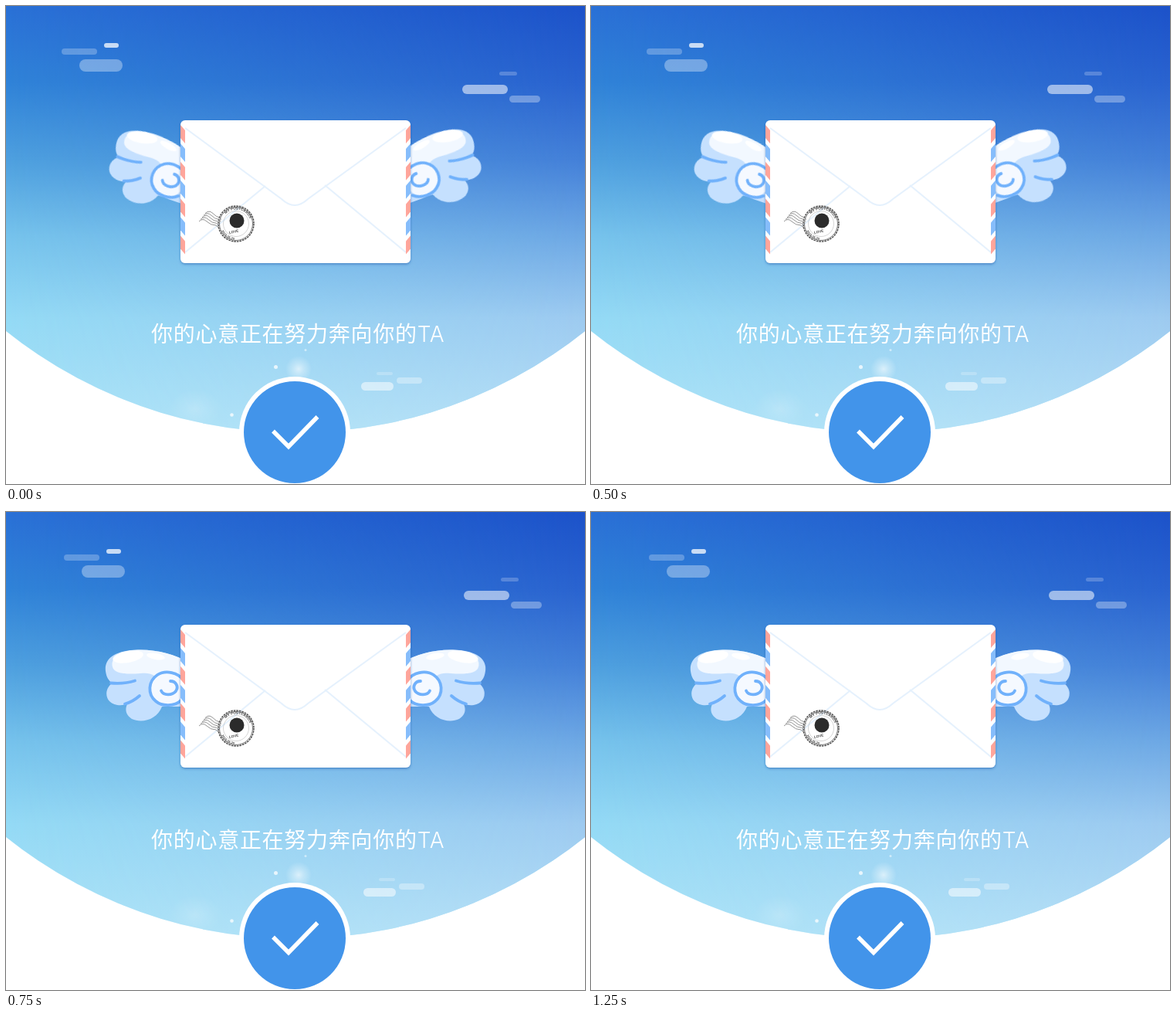
These frames come from a looping animation (750x619 px, 1500 ms). An HTML page:

```html
<!DOCTYPE html>
<html lang="zh-CN">
<head>
<meta charset="utf-8">
<title>飞行的信封</title>
<style>
  html, body { margin: 0; width: 100%; height: 100%; overflow: hidden; background: #fff; }
  svg { display: block; width: 750px; height: 619px; }

  .envelope { animation: bob .5s step-end infinite; }
  .wing {
    transform-origin: 209px 229px;
    animation: flap .5s step-end infinite;
  }
  .cloud {
    fill: #fff;
    animation: drift 1.5s step-end infinite;
  }

  @keyframes bob {
    0% { transform: none; }
    50%, 100% { transform: translateY(-2px); }
  }
  @keyframes flap {
    0% { transform: translate(var(--dx), var(--dy)) rotate(var(--lift)); }
    50%, 100% { transform: none; }
  }
  @keyframes drift {
    0% { transform: none; }
    16.6667%, 50%, 83.3333% { transform: translateX(var(--far)); }
    33.3333% { transform: translateX(var(--mid)); }
    66.6667% { transform: translateX(var(--near)); }
    100% { transform: none; }
  }

  .caption {
    font: 300 28px "Noto Sans CJK SC", "Noto Sans CJK", sans-serif;
    letter-spacing: .72px;
    fill: #fff;
  }
  .caption .latin { font-family: Inter, sans-serif; }
  .postmark { font: 700 4.6px "Liberation Sans", sans-serif; fill: #444; }
</style>
</head>
<body>
<svg viewBox="0 0 750 619">
  <defs>
    <linearGradient id="skyLeft" gradientUnits="userSpaceOnUse" x1="0" y1="0" x2="0" y2="553">
      <stop offset="0" stop-color="#2a70d6"/>
      <stop offset=".18" stop-color="#3083d8"/>
      <stop offset=".36" stop-color="#4ea0df"/>
      <stop offset=".54" stop-color="#76c3ec"/>
      <stop offset=".73" stop-color="#94daf5"/>
      <stop offset="1" stop-color="#ace4f8"/>
    </linearGradient>
    <linearGradient id="skyRight" gradientUnits="userSpaceOnUse" x1="0" y1="0" x2="0" y2="553">
      <stop offset="0" stop-color="#1c52c9"/>
      <stop offset=".18" stop-color="#2a63cf"/>
      <stop offset=".36" stop-color="#4480d8"/>
      <stop offset=".54" stop-color="#6ea8e4"/>
      <stop offset=".73" stop-color="#9dcaf0"/>
      <stop offset="1" stop-color="#b8e0f6"/>
    </linearGradient>
    <linearGradient id="fade">
      <stop offset="0" stop-color="#000"/>
      <stop offset="1" stop-color="#fff"/>
    </linearGradient>
    <mask id="toRight" style="mask-type:luminance" color-interpolation="sRGB">
      <rect width="750" height="619" fill="url(#fade)"/>
    </mask>
    <radialGradient id="glow">
      <stop offset="0" stop-color="#fff" stop-opacity=".6"/>
      <stop offset=".4" stop-color="#fff" stop-opacity=".32"/>
      <stop offset="1" stop-color="#fff" stop-opacity="0"/>
    </radialGradient>
    <clipPath id="dome"><circle cx="375" cy="-47.9" r="600.4"/></clipPath>
    <filter id="shadow" x="-5%" y="-5%" width="110%" height="112%">
      <feDropShadow dx="0" dy="1.5" stdDeviation="1.5" flood-color="#1c5aa8" flood-opacity=".55"/>
    </filter>

    <g id="wing">
      <path fill="#c5e0fe" d="M236 194 C219 185 197 178 171 178.500 C141 179 127 190 129 206
        C130 214 133 219 138 221.500 C129 227 128 239 134 245 C140 251 149 251 157 249
        C153 258 157 264 163 268 C176 274 196 269 202 252 L236 252Z"/>
      <path fill="#f2f8ff" d="M236 194 C219 185 197 178 171 178.500 C151 179 137 187 137.500 198
        C138 209 153 210 167 209.500 C177 209 185 207 192 212 L236 218Z"/>
      <ellipse cx="158" cy="187.500" rx="20" ry="7.500" fill="#fff" transform="rotate(-10 158 187)"/>
      <ellipse cx="194" cy="187" rx="12" ry="4" fill="#fff" transform="rotate(10 194 187)"/>
      <circle cx="208" cy="229" r="21.500" fill="#f5f9ff"/>
      <g fill="none" stroke="#70b1fb" stroke-width="3.800" stroke-linecap="round">
        <path d="M136 221.500 Q153 223 167 218.500"/>
        <path d="M154 248.500 Q164 246 173 238"/>
        <path d="M230 218 C223 208 207 204 196 211 C184 219 183 236 194 245 C202 252 218 252 227 244"/>
        <path d="M201 231.500 C204 238 215 238 220 232 C224 226 220 219 213 219"/>
      </g>
    </g>
    <g id="edge"></g>
    <path id="ringTop" d="M279.500 280 A18.800 18.800 0 0 1 316.800 280"/>
    <path id="ringBottom" d="M278.500 287 A20 20 0 0 0 312 296"/>
  </defs>

  <g clip-path="url(#dome)">
    <rect width="750" height="619" fill="url(#skyLeft)"/>
    <rect width="750" height="619" fill="url(#skyRight)" mask="url(#toRight)"/>
    <ellipse cx="245" cy="522" rx="34" ry="26" fill="url(#glow)" opacity=".3"/>
    <circle cx="379" cy="470" r="17" fill="url(#glow)"/>
    <g fill="#fff">
      <circle cx="349.500" cy="467.500" r="2.500" opacity=".75"/>
      <circle cx="388" cy="445.500" r="1.500" opacity=".5"/>
      <circle cx="292.500" cy="529.500" r="2.300" opacity=".75"/>
    </g>
  </g>

  <g class="cloud" style="--far:3px; --mid:0px; --near:1px">
    <rect x="72" y="55" width="46" height="8" rx="4" opacity=".25"/>
    <rect x="127" y="48" width="19" height="6" rx="3" opacity=".75"/>
    <rect x="95" y="69" width="56" height="16" rx="8" opacity=".34"/>
  </g>
  <g class="cloud" style="--far:2px; --mid:0px; --near:-1px">
    <rect x="591" y="102" width="59" height="12" rx="6" opacity=".54"/>
    <rect x="639" y="85" width="23" height="5" rx="2.500" opacity=".22"/>
    <rect x="652" y="116" width="40" height="9" rx="4.500" opacity=".32"/>
  </g>
  <g class="cloud" style="--far:3px; --mid:-1px; --near:0px">
    <rect x="460" y="487" width="42" height="11" rx="5.500" opacity=".52"/>
    <rect x="480" y="474" width="21" height="4" rx="2" opacity=".22"/>
    <rect x="506" y="481" width="33" height="8" rx="4" opacity=".34"/>
  </g>

  <g class="wing" style="--dx:2px; --dy:-3px; --lift:19deg"><use href="#wing"/></g>
  <g transform="matrix(-1 0 0 1 750 0)">
    <g class="wing" style="--dx:2.500px; --dy:-4px; --lift:20deg"><use href="#wing"/></g>
  </g>

  <g class="envelope">
    <rect x="226" y="148" width="298" height="185" rx="6" fill="#fff" filter="url(#shadow)"/>
    <g fill="none" stroke="#e5f1fd" stroke-width="2">
      <path d="M232 158 L357 250 Q374 266 391 250 L518 158"/>
      <path d="M336 233 L232 319 M413 232 L518 319"/>
    </g>
    <use href="#edge"/>
    <use href="#edge" transform="matrix(-1 0 0 1 750 0)"/>

    <g fill="none" stroke="#555">
      <circle cx="298" cy="282" r="23" stroke-width="1.600" stroke-dasharray="2.600 1"/>
      <circle cx="298" cy="282" r="21.500" stroke-width=".8"/>
      <circle cx="298" cy="282" r="16.500" stroke-width=".5" stroke="#aaa"/>
      <g id="waves" stroke-width=".9" stroke="#888"></g>
    </g>
    <circle cx="299" cy="278" r="9.500" fill="#2b2b2b"/>
    <g class="postmark">
      <text><textPath href="#ringTop" startOffset="12">MY POSTCARDS</textPath></text>
      <text font-size="4" dy="1"><textPath href="#ringBottom" startOffset="4">2016.05.20</textPath></text>
      <text x="289" y="294" transform="rotate(-12 294 293)">LOVE</text>
    </g>
  </g>

  <text class="caption" x="188" y="435">你的心意正在努力奔向你的<tspan class="latin">TA</tspan></text>

  <circle cx="374" cy="552" r="72" fill="#fff"/>
  <circle cx="374" cy="552" r="66" fill="#4294ea"/>
  <path d="M346 550.500 L366 570.500 L403.500 532" fill="none" stroke="#fff" stroke-width="5.500"/>
</svg>
<script>
  const add = (id, attrs) => {
    const path = document.createElementNS('http://www.w3.org/2000/svg', 'path');
    for (const key in attrs) path.setAttribute(key, attrs[key]);
    document.getElementById(id).append(path);
  };

  // Airmail stripes down one side
  for (let i = 0; i < 7; i++) {
    const y = 166 + 23.9 * i;
    add('edge', {
      d: `M226 ${y - 12} L232 ${y - 5} V${y + 12} L226 ${y + 5}Z`,
      fill: i % 2 ? '#86bdfb' : '#ffa59b'
    });
  }

  // Cancellation lines beside the postmark
  for (let i = 0; i < 5; i++) {
    add('waves', { d: `M${250 + i * 2} ${279 - i * 2.6} q5 -5 10 0 t${12 - i} 5 l3 3` });
  }
</script>
</body>
</html>
```
